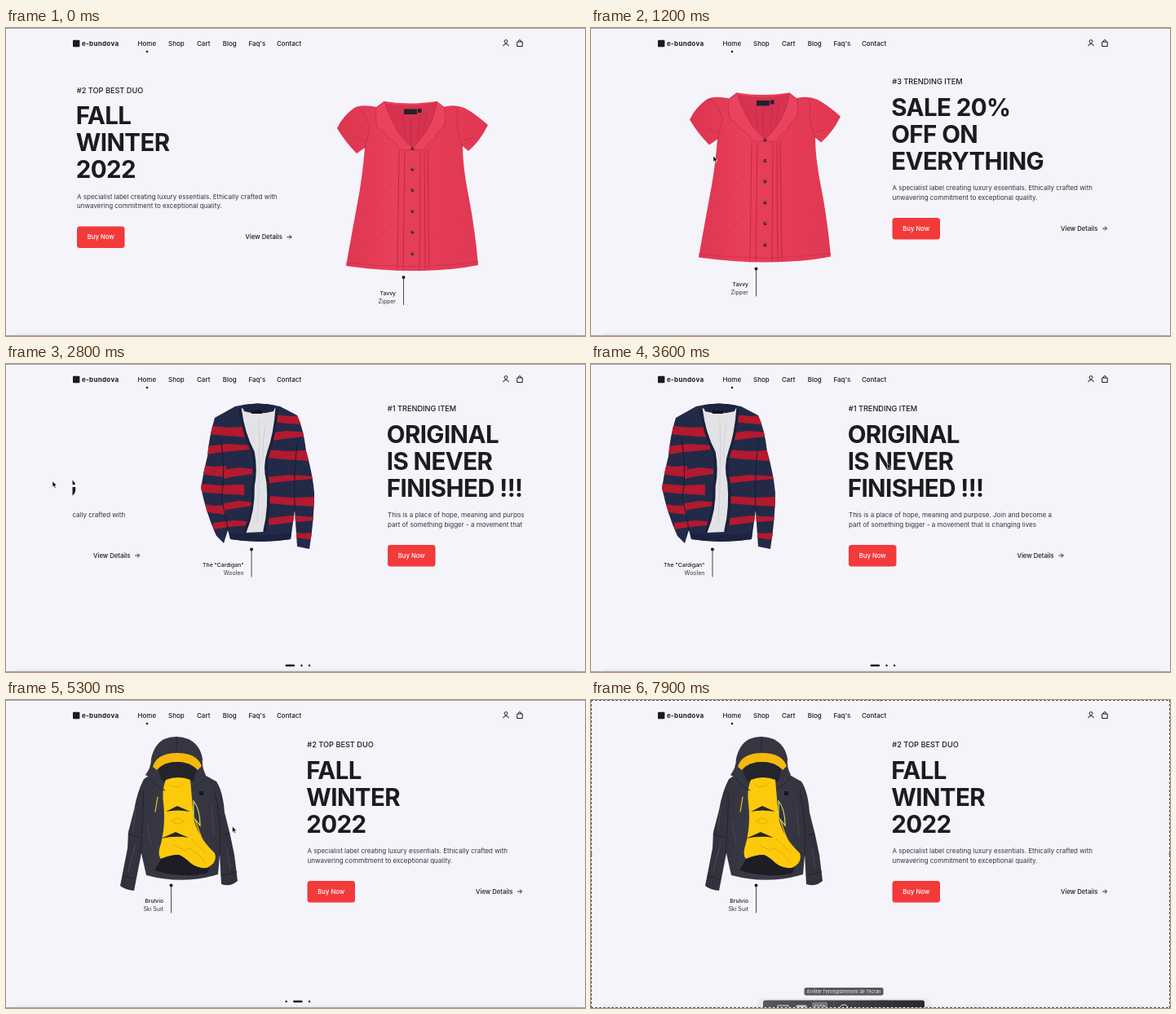
An HTML page that plays this animation: 710 by 378 pixels, repeating every 8.2 s.

```html
<!DOCTYPE html>
<html lang="en">
<head>
<meta charset="utf-8">
<title>Shop slider</title>
<style>
html, body { margin: 0; height: 100%; overflow: hidden; background: #f5f4fb; }
svg { display: block; width: 100%; height: 100%; font-family: Inter, "Open Sans", sans-serif; fill: #1c1b22; }
.nav { font-size: 8px; font-weight: 500; }
.brand { font-size: 8px; font-weight: 700; letter-spacing: .3px; }
.tag { font-size: 9.2px; font-weight: 500; }
.head { font-size: 29.5px; font-weight: 700; letter-spacing: -.02em; }
.para { font-size: 8px; fill: #34333c; }
.act { font-size: 7.7px; font-weight: 500; }
.name { font-size: 6.8px; font-weight: 500; text-anchor: end; }
.kind { font-size: 7px; fill: #34333c; text-anchor: end; }
.tip { font-size: 5.6px; fill: #f0f0f0; text-anchor: middle; }
.line { fill: none; stroke: #1c1b22; }
</style>
</head>
<body>
<svg id="stage" viewBox="0 0 710 378"></svg>
<script>
const LOOP = 8200, STEP = 567.5, INK = '#1c1b22';
const text = (cls, x, y, s) => `<text class="${cls}" x="${x}" y="${y}">${s}</text>`;
const path = (d, fill, more = '') => `<path d="${d}" fill="${fill}" ${more}/>`;
const stroke = (d, color, w, more = '') => path(d, 'none', `stroke="${color}" stroke-width="${w}" stroke-linecap="round" ${more}`);
const rect = (x, y, w, h, fill, r = 0) => `<rect x="${x}" y="${y}" width="${w}" height="${h}" rx="${r}" fill="${fill}"/>`;
const dot = (x, y, r, fill = INK) => `<circle cx="${x}" cy="${y}" r="${r}" fill="${fill}"/>`;

function blouse() {
  const body = 'M454 97C444 95 434 94 427 98Q413 108 406 123Q416 140 430 154L440 147Q437 185 430 220Q423 258 417 292Q460 298 500 298Q545 298 579 291Q575 245 567 205Q560 170 560 145L567 151Q582 138 591 119Q574 104 562 98Q550 93 536 97L528 90Q495 95 464 90Z';
  const buttons = [148, 173.5, 199, 225, 250.5, 277].map(y =>
    dot(498.5, y, 2.1, '#3d2430') + dot(499.1, y - .6, .7, '#d9a9b0')).join('');
  return `<g transform="translate(-285 -21.5)">` +
    path(body, 'url(#red)') +
    path('M463 92Q496 99 529 91L521 122L500 147L478 128Z', '#d5334f') +
    stroke('M486 106L490 135M496 107V143M507 106L505 138M516 104L511 130', '#bf2a46', .7) +
    rect(488, 99.5, 16, 6.5, '#22212a') + rect(505, 99, 4.5, 5, '#22212a') +
    path('M464 90L454 98Q452 117 457 124Q465 126 468 135Q478 138 482 148Q492 153 499 147Q484 136 476 119Q468 105 464 90Z', '#ea435e', 'stroke="#c22a46" stroke-width=".7"') +
    path('M528 90L537 97Q541 112 536 122Q528 126 526 136Q517 140 514 148Q505 153 499 147Q515 131 522 114Q527 103 528 90Z', '#ea435e', 'stroke="#c22a46" stroke-width=".7"') +
    stroke('M482 151L480 296M489 152L487 297M508 152L507 297M513 151L514 297M517 150L519 296', '#bd2743', .9) +
    stroke('M440 147L446 122Q442 106 432 98M560 145Q552 125 553 112Q556 102 550 96M428 134L441 139M572 135L562 138', '#c22a46', .8) +
    stroke('M433 270Q455 264 476 238M437 225Q458 215 472 190M530 200Q547 230 566 240M528 250Q550 272 571 277', '#d9374f', 1) +
    stroke('M417 288Q500 298 579 287', '#c22a46', .6) + buttons + '</g>';
}

function cardigan() {
  const body = 'M281 52Q308 45 336 52L357 63Q365 80 368 107Q376 135 378 158Q378 190 372 227L357 224L354 180L349 215Q312 221 275 215L272 204L267 220L258 211Q246 185 239 152Q242 132 247 113Q249 88 256 66Z';
  const stripes = [
    [250, 78, 46, 10], [246, 98, 52, 10], [240, 126, 30, 11], [266, 127, 36, 11], [238, 149, 54, 10],
    [266, 168, 38, 9], [243, 174, 26, 9], [254, 192, 50, 8], [326, 64, 46, 9], [322, 82, 44, 10],
    [320, 107, 52, 10], [318, 136, 58, 8], [322, 164, 58, 9], [322, 186, 56, 9], [352, 208, 24, 6]
  ].map(([x, y, w, h], i) => {
    const k = i % 2 ? 3 : -2;
    return `M${x} ${y + k}L${x + w * .5} ${y}L${x + w} ${y + k * .6}V${y + h - k}L${x + w * .4} ${y + h}L${x} ${y + h + k}Z`;
  }).join('');
  return `<g transform="translate(-98.5 0)"><clipPath id="knit"><path d="${body}"/></clipPath>` +
    path(body, '#222a48') + `<g clip-path="url(#knit)">` + path(stripes, '#b3192f') + '</g>' +
    path('M288 54Q309 62 331 54Q330 82 322 108Q316 124 320 145Q323 175 316 206L294 207Q304 180 303 150Q307 125 301 105Q290 80 288 54Z', '#e3e3e7') +
    stroke('M310 70Q312 120 308 195M318 75Q314 95 315 115', '#cfcfd6', 1) +
    stroke('M287 55Q291 86 303 108Q307 130 303 150Q304 180 293 206M332 55Q330 85 322 108Q316 125 321 145Q324 175 317 205', '#1a2139', 3.4) +
    path('M289 51Q309 46 331 51L328 58Q309 63 292 58Z', '#1d2440') + rect(301, 57, 13, 4, '#111522') +
    stroke('M263 92Q270 130 264 164Q270 190 272 204M358 92Q352 130 354 180', '#151c34', 1) +
    path('M274 207Q312 212 350 207L349 215Q312 221 275 215Z', '#1c2340') + '</g>';
}

function jacket() {
  return path('M178 91L169 97Q161 112 157 135L150 162L149 182L140 228Q146 233 157 234L166 188L172 215Q216 227 260 214L262 190L264 226Q275 230 284 222L280 190L275 166L268 138Q266 112 258 100L242 91Z', 'url(#coat)') +
    path('M171 92Q178 83 178 72Q182 54 194 48Q208 42 224 48Q238 55 241 72Q240 83 245 92Q228 103 210 101Q190 103 171 92Z', '#353641') +
    path('M180 82Q185 65 210 65Q234 65 240 81L235 86Q225 76 210 76Q194 76 185 86Z', '#f4b90c') +
    path('M186 85Q194 76 210 76Q225 76 234 85L230 99Q211 106 191 99Z', '#23242c') +
    path('M196 98Q211 92 226 98Q228 120 230 145Q235 168 256 188Q260 200 246 206Q234 207 226 200Q219 193 212 190Q202 190 190 195Q185 190 190 176Q196 153 193 126Q191 110 196 98Z', '#fcca0b') +
    path('M190 195Q202 190 212 190Q219 193 226 200Q236 208 250 206L246 213Q214 219 182 209Z', '#1d1d23') +
    path('M196 137L210 130L226 137Q210 134 196 137ZM190 170L208 162L224 169Q208 166 190 170Z', '#26262c') +
    stroke('M201 104Q209 110 217 103M203 148Q210 142 218 149Q210 156 203 148M222 181Q236 187 245 200M228 171L245 188M206 178L221 185', '#dca50a', .8) +
    stroke('M186 119L183 137M226 121Q229 145 247 186', '#f1c51a', 1.2) +
    path('M230 124Q238 134 238 154L230 144Z', '#33343f', 'stroke="#d7df5a" stroke-width="1.2"') +
    rect(237, 112, 5, 5, '#15161d') +
    stroke('M168 112Q169 140 165 188M256 112Q265 150 262 190M150 165L165 169M265 166L274 164M143 216L158 220M264 215L283 211M177 96Q184 106 195 111M243 96Q236 106 228 109M209 46L209 62', '#22232c', 1) +
    stroke('M159 132L156 160M159 176L150 210M173 150L178 178M252 130L255 166M271 182L275 207', '#474855', 1);
}

const button = label => rect(369.5, 222, 58.5, 26.5, '#f23a3a', 3.5) +
  `<text class="act" x="398.7" y="237.8" text-anchor="middle" style="fill:#fff">${label}</text>`;

function slide(i, s) {
  const y = s.pinY;
  return `<g transform="translate(${i * STEP} 0)">` + s.art() +
    stroke(`M202.5 ${y}V${y + 33.5}`, INK, .8) + dot(202.5, y, 2) +
    text('name', 193, y + 21.5, s.name) + text('kind', 193, y + 31.5, s.kind) +
    text('tag', 369.3, 58, s.tag) +
    s.head.map((h, k) => text('head', 368.2, 96.6 + k * 33, h)).join('') +
    s.para.map((p, k) => text('para', 369.5, 188.3 + k * 11.5, p)).join('') +
    button('Buy Now') + text('act', 576, 237.8, 'View Details') +
    stroke('M627.5 235H632.5M630.3 232.7L632.6 235L630.3 237.3', INK, .9) + '</g>';
}

const luxury = ['A specialist label creating luxury essentials. Ethically crafted with', 'unwavering commitment to exceptional quality.'];
const fall = { art: jacket, pinY: 227.5, name: 'Brulvio', kind: 'Ski Suit', tag: '#2 TOP BEST DUO', head: ['FALL', 'WINTER', '2022'], para: luxury };
const sale = { art: blouse, pinY: 284.5, name: 'Tavvy', kind: 'Zipper', tag: '#3 TRENDING ITEM', head: ['SALE 20%', 'OFF ON', 'EVERYTHING'], para: luxury };
const finish = { art: cardigan, pinY: 227.5, name: 'The "Cardigan"', kind: 'Woolen', tag: '#1 TRENDING ITEM', head: ['ORIGINAL', 'IS NEVER', 'FINISHED !!!'],
  para: ['This is a place of hope, meaning and purpose. Join and become a', 'part of something bigger - a movement that is changing lives'] };

const nav = [['Home', 161.5], ['Shop', 199], ['Cart', 234], ['Blog', 265.7], ["Faq's", 297.5], ['Contact', 332]];
const header = rect(82, 14.8, 8.4, 8.4, INK, 1) + text('brand', 93, 22.2, 'e-bundova') +
  nav.map(([s, x]) => text('nav', x, 22.2, s)).join('') + dot(173, 29, 1.3) +
  '<g class="line" stroke-width="1"><circle cx="613" cy="16.5" r="1.9"/><path d="M609.7 22.3Q609.8 19.6 613 19.6T616.3 22.3M626.7 17H633.3V22.5H626.7ZM628.3 17Q628.3 14.6 630 14.6T631.7 17"/></g>';

const toolbar = '<rect x="203" y="366" width="214" height="20" rx="8" fill="#000" opacity=".04"/>' +
  rect(211, 368.5, 198, 14, 'url(#bar)', 3) + dot(219.5, 379, 2.6, '#c8c8c8') +
  rect(271, 370.5, 19, 10, '#77777a', 2) +
  '<g fill="none" stroke="#dedede"><path d="M229 378V375H242V378M252 378V375H264V378"/><path d="M274 378V375H287V378" stroke-dasharray="2 1.2"/><path d="M298 370V378" stroke="#666" stroke-width=".6"/><circle cx="310" cy="379.5" r="5.5"/></g>' +
  rect(253, 375.5, 10, 2.5, '#dedede') + rect(308, 377, 4, 4, '#dedede');

const frame = `<path d="M0 .5H710M0 377.5H710M.5 0V378M709.5 0V378" fill="none" stroke="#fff"/>` +
  `<path d="M0 .5H710M0 377.5H710M.5 0V378M709.5 0V378" fill="none" stroke="#55555a" stroke-dasharray="3 2"/>` +
  dot(355, 0, 1.5, '#777') + dot(0, 189, 1.5, '#777') + dot(710, 189, 1.5, '#777');

const $ = id => document.getElementById(id);
$('stage').innerHTML = `<defs>
  <clipPath id="view"><rect x="81.5" y="0" width="553.5" height="378"/></clipPath>
  <linearGradient id="red"><stop stop-color="#dc3550"/><stop offset=".35" stop-color="#e83f5a"/><stop offset="1" stop-color="#e03852"/></linearGradient>
  <linearGradient id="coat"><stop stop-color="#2f303b"/><stop offset=".5" stop-color="#3a3b47"/><stop offset="1" stop-color="#2f303b"/></linearGradient>
  <linearGradient id="bar"><stop stop-color="#58585b"/><stop offset="1" stop-color="#29292c"/></linearGradient>
  <linearGradient id="shade" x2="0" y2="1"><stop stop-color="#e9e8ef" stop-opacity="0"/><stop offset="1" stop-color="#e9e8ef"/></linearGradient>
  </defs>
  <g clip-path="url(#view)"><g id="track">${[fall, sale, finish, fall].map((s, i) => slide(i, s)).join('')}</g></g>
  ${header}
  ${rect(14, 373, 684, 4, 'url(#shade)')}
  <g id="dots"></g>
  <g id="edges">${rect(0, 0, 710, 1, '#a3a2a8') + rect(0, 377, 710, 1, '#a3a2a8')}</g>
  <g id="toolbar">${toolbar}</g>
  <g id="frame">${frame}</g>
  <g id="tip">${rect(261.5, 353, 97, 9.6, '#58585b', 2) + text('tip', 310, 359.9, "Arrêter l'enregistrement de l'écran")}</g>
  <g id="cursor"><path id="arrow" d="M0 0V7.4L1.7 5.9L2.9 8.6L4.2 8L3 5.4H5.2Z" fill="#000" stroke="#fff" stroke-width=".6"/>
  <path id="beam" d="M-1.5 -4Q0 -4 0 -3Q0 -4 1.5 -4M0 -3V4M-1.5 5Q0 5 0 4Q0 5 1.5 5" fill="none" stroke="#333" stroke-width=".8"/></g>`;

const smooth = u => u * u * (3 - 2 * u), out = u => 1 - (1 - u) ** 2;

// Keys are [time, value, easing into this key]
function key(t, keys) {
  const i = keys.findIndex(k => k[0] > t);
  if (i < 0) return keys[keys.length - 1][1];
  if (!i) return keys[0][1];
  const [t0, a] = keys[i - 1], [t1, b, ease = smooth] = keys[i];
  return a + (b - a) * ease((t - t0) / (t1 - t0));
}

// Three drags, each followed by a snap to the next slide
const scroll = [[0, 282.5], [330, 282.5], [620, 404], [920, STEP, out], [1945, STEP], [2400, 901], [2560, 901],
  [2707, 928], [3007, 2 * STEP, out], [3450, 2 * STEP], [4100, 1531], [4400, 3 * STEP, out]];
const lift = [[1000, 21.5], [1700, 0, out]];
const mouseX = [[330, 197], [620, 75], [700, 81], [1000, 95], [1200, 150], [1700, 417.5], [1945, 417.5], [2400, 84], [2560, 84],
  [2707, 57], [2850, 57], [3300, 417], [3450, 417], [4100, 21], [4400, 21], [5200, 296], [5300, 277.5], [5400, 256], [5500, 237],
  [6900, 237], [6901, 156], [7400, 310]];
const mouseY = [[330, 137], [620, 153], [1700, 160], [2400, 150], [2707, 145], [3300, 125], [4100, 114], [4400, 114],
  [5200, 215], [5300, 155], [5400, 130], [5500, 163], [6900, 163], [6901, 52], [7400, 380]];

const show = (id, on) => $(id).style.display = on ? '' : 'none';

function dots(active) {
  let x = 342.5;
  return [1, 2, 3].map(i => {
    const w = i === active ? 11.6 : 2.4, mark = rect(x, 368.8, w, 2.4, INK, 1.2);
    x += w + 7.2;
    return mark;
  }).join('');
}

function draw(now) {
  const t = Math.floor(now % LOOP / 100) * 100;   // ten pictures a second
  const y = key(t, lift);
  $('track').setAttribute('transform', `translate(${-key(t, scroll)} ${y})`);
  $('dots').setAttribute('transform', `translate(0 ${y})`);
  $('dots').innerHTML = dots(t < 620 ? 2 : t < 2707 ? 3 : t < 4100 ? 1 : 2);
  const beam = t < 500 || t >= 1600 && t < 2300;
  $('cursor').setAttribute('transform', `translate(${key(t, mouseX)} ${key(t, mouseY)})`);
  show('cursor', t < 6000 || t >= 7000 && t < 7400);
  show('beam', beam);
  show('arrow', !beam);
  show('edges', t < 6700);
  show('frame', t >= 6700);
  show('toolbar', t >= 7000);
  show('tip', t >= 7900);
}

const start = performance.now();
function tick() {
  draw(performance.now() - start);
  requestAnimationFrame(tick);
}
tick();
</script>
</body>
</html>
```
